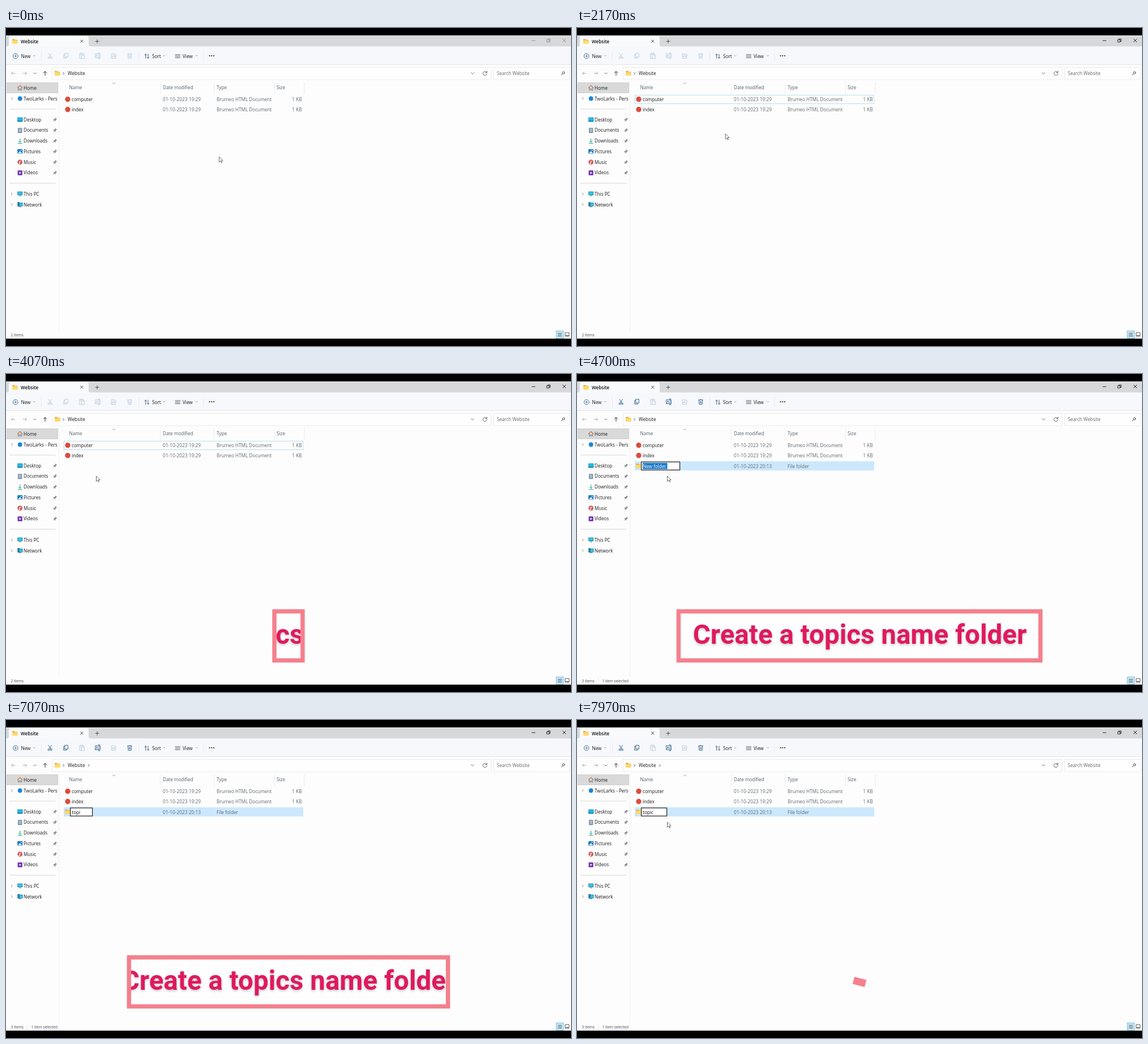
These frames come from a looping animation (998 px wide and 561 px high, 8000 ms). An HTML page:

```html
<!DOCTYPE html>
<html lang="en">
<head>
<meta charset="utf-8">
<title>New folder</title>
<style>
html, body { margin: 0; width: 100%; height: 100%; overflow: hidden; background: #000; }
svg { position: fixed; inset: 0; width: 100%; height: 100%; display: block; }
text { font-family: "Open Sans", "Noto Sans", sans-serif; white-space: pre; }
.banner text { font: 700 47.5px Roboto, sans-serif; fill: #e0195f; filter: drop-shadow(0 2px 2px rgba(0, 0, 0, .22)); }
</style>
</head>
<body>
<svg id="stage" viewBox="0 0 998 561"></svg>
<script>
const LOOP = 8000;
const stage = document.getElementById('stage');

function el(tag, attrs = {}, parent = stage) {
  const node = document.createElementNS('http://www.w3.org/2000/svg', tag);
  for (const k in attrs) node.setAttribute(k, attrs[k]);
  parent.appendChild(node);
  return node;
}
function set(node, attrs) { for (const k in attrs) node.setAttribute(k, attrs[k]); }
const group = (attrs, parent) => el('g', attrs, parent);
const box = (x, y, w, h, fill, more = {}, parent) =>
  el('rect', { x, y, width: w, height: h, fill, ...more }, parent);
const line = (d, stroke, w = 1, parent) =>
  el('path', { d, stroke, 'stroke-width': w, fill: 'none', 'stroke-linecap': 'round', 'stroke-linejoin': 'round' }, parent);
const shape = (d, fill, parent) => el('path', { d, fill }, parent);
const dot = (cx, cy, r, fill, parent) => el('circle', { cx, cy, r, fill }, parent);
function text(x, y, str, fill = '#1c1c1c', size = 8.2, more = {}, parent) {
  const node = el('text', { x, y, fill, 'font-size': size, ...more }, parent);
  node.textContent = str;
  return node;
}
const show = (node, on) => node.setAttribute('visibility', on ? 'visible' : 'hidden');

function folder(x, y, parent) {
  shape(`M${x} ${y + 1}q0 -1 1 -1h2.6l1.2 1.2h3.6q1 0 1 1v4.6q0 1 -1 1h-7.4q-1 0 -1 -1z`, '#e8ab2c', parent);
  box(x, y + 2, 9.4, 5.8, '#ffd968', { rx: .8 }, parent);
}

// Window frame
box(0, 13, 998, 535, '#fdfdfd');
box(0, 13, 998, 20, '#d6d8da');
box(0, 32.5, 998, 32, '#f6f8fc');
shape('M1 33q4 0 4 -4v-11q0 -4 4 -4h133q4 0 4 4v11q0 4 4 4z', '#f8fafc');
box(0, 64, 998, 1, '#e3e5e8');
folder(11, 19.5);
text(26, 26.7, 'Website', '#111', 8.1, { 'font-weight': 600 });
line('M131.5 21l4.4 4.4M135.9 21l-4.4 4.4', '#333', .9);
line('M158 23.5h6M161 20.5v6', '#444', .9);
const controls = group({});
line('M929 22.3h5.5', 'currentColor', .9, controls);
line('M955.5 20.8h4v4h-4zM957 20.6v-1.3h4.2v4.2h-1.4', 'currentColor', .9, controls);
line('M983.3 19.3l5.4 5.4M988.7 19.3l-5.4 5.4', 'currentColor', .9, controls);

// Toolbar
const chevron = (x, y, s = 1.5, c = '#888') => line(`M${x - s} ${y - s / 2}l${s} ${s}l${s} ${-s}`, c, .8);
el('circle', { cx: 16.8, cy: 49.5, r: 4.3, fill: 'none', stroke: '#3a5f78', 'stroke-width': .9 });
line('M14.8 49.5h4M16.8 47.5v4', '#2d7fb8', .9);
text(26.5, 52.8, 'New');
chevron(50, 49);
for (const x of [62, 234, 348.5]) box(x, 41, .8, 17, '#e4e7ea');

const icons = [
  ['M75 44.5l4.3 7.2M80.4 44.5l-4.3 7.2M77 52.5a1.5 1.5 0 1 1 -3 0a1.5 1.5 0 1 1 3 0M81.4 52.5a1.5 1.5 0 1 1 -3 0a1.5 1.5 0 1 1 3 0', 1],
  ['M104.2 44.5h5.2v6.6h-5.2zM104 46.6h-2.2v6.6h5.3v-2', 1],
  ['M131.5 45.3h-1.6v8.2h3M135.8 45.3h1.6v2M131.5 44.3h4.3v2h-4.3zM133.4 48h5v6h-5z', 0],
  ['M163 45.5h-5.3v7h5.3M165.5 45.5h1v7h-1M164.3 43.8v10.4M163.2 43.8h2.2M163.2 54.2h2.2M159 51l1.6 -4l1.6 4', 1],
  ['M189.5 45.2h-3.3v8.2h7.5v-2.4M188 51q.5 -4 4 -4v-2.2l3 3.3l-3 3.2v-2q-2.500 0 -4 1.700z', 0],
  ['M214.500 45.800h8M217 45.600q1.500 -2.500 3 0M215.300 46l.6 7.500h5.200l.6 -7.500M217.600 48.200v3.300M219.400 48.200v3.300', 1]
].map(([d, live]) => ({ node: line(d, '#b9cbd9', .9), live }));

line('M246.700 53.500v-7.500M244.900 47.800l1.800 -1.800l1.800 1.800M251 46v7.500M249.200 51.700l1.800 1.800l1.800 -1.800', '#36566e', .9);
text(258, 52.8, 'Sort');
chevron(279.5, 49);
line('M299 47h8.500M299 49.700h8.500M299 52.400h8.500', '#444', .9);
text(312, 52.8, 'View');
chevron(337, 49);
for (const x of [359.6, 363.3, 367]) dot(x, 49, 1.1, '#222');

// Address row
line('M16 80h-6.500M12 77.500l-2.500 2.500l2.500 2.500', '#a2a6a9', .9);
line('M30 80h6.500M34 77.500l2.500 2.500l-2.500 2.500', '#a2a6a9', .9);
chevron(51, 80, 2, '#555');
line('M69 83.500v-7M66 79.500l3 -3l3 3', '#333', 1);
box(81.5, 69.5, 775.5, 21.5, '#fefefe', { stroke: '#e6e7e9', 'stroke-width': .8 });
box(861.5, 69.5, 134, 21.5, '#fefefe', { stroke: '#e6e7e9', 'stroke-width': .8 });
folder(86, 75.8);
line('M100.800 78.300l1.900 1.900l-1.900 1.900', '#444', .9);
text(109, 83.2, 'Website');
const crumb = line('M145.500 78.300l1.900 1.900l-1.900 1.900', '#444', .9);
chevron(824, 80, 2.6, '#555');
line('M849 78.300a3.500 3.500 0 1 0 .5 2.200M849.500 76v2.500h-2.500', '#555', .9);
text(867, 83.4, 'Search Website', '#666', 8.1);
line('M986.800 79a2 2 0 1 1 -4 0a2 2 0 1 1 4 0M983.200 80.500l-2.200 2.300', '#444', 1);

// Sidebar
box(93, 96, .8, 438, '#ededed');
box(1.5, 96.5, 90, 18, '#d9d9d9', { stroke: '#c6c6c6', 'stroke-width': .7 });
line('M20.500 105.500l4.200 -4l4.200 4', '#d0703a', 1.1);
line('M21.700 105.500v4.200h2v-2.500h2v2.500h2v-4.200', '#70757a', .9);
text(31, 108.5, 'Home');
dot(24.7, 124.5, 3.9, '#1a86d9');
text(31, 127.5, 'TwoLarks - Pers');
for (const y of [124.5, 292.7, 311.5]) line(`M9.300 ${y - 2}l2 2l-2 2`, '#777', .8);
for (const y of [142.6, 273.4]) box(6, y, 81.5, .9, '#d4d4d4');

['Desktop', 'Documents', 'Downloads', 'Pictures', 'Music', 'Videos'].forEach((name, i) => {
  const y = 161.7 + i * 18.75;
  text(31, y + 3, name, '#1c1c1c', 8.1);
  const pin = group({ transform: `translate(86.500 ${y}) rotate(45)` });
  shape('M-1.700 -3.200h3.400v.9l-.6 .4v1.700l1.400 1.300v.7h-5v-.7l1.400 -1.300v-1.700l-.6 -.4z', '#7d868c', pin);
  line('M0 1.500v2.600', '#7d868c', .7, pin);
});
box(20, 157.8, 9.4, 7.8, '#0d83b6', { rx: .8 });
box(20, 157.8, 9.4, 5.6, '#29b6dd', { rx: .8 });
box(21, 176.2, 7.4, 9, '#7790a5', { rx: .8 });
for (const y of [178, 180, 182]) box(22.5, y, 4.4, 1, '#dbe6ee');
line('M24.700 195.500v6.200M22.300 199.500l2.400 2.400l2.400 -2.400M21.300 203.700h7', '#17a286', 1);
box(20.2, 213.8, 9, 8.2, '#1976c4', { rx: 1 });
shape('M20.500 221.500l4 -4.500l4.500 4.500z', '#d8efff');
dot(26.7, 216, .9, '#fff');
dot(24.7, 236.7, 4.4, '#cf5a60');
line('M24.300 238.800v-4.200l2 .8', '#fff', .9);
dot(23.5, 238.8, 1.1, '#fff');
box(20.6, 251.2, 8.2, 8.6, '#7230b5', { rx: .9 });
shape('M23.500 253.500l3.500 2l-3.500 2z', '#fff');
function monitor(x, y) {
  box(x, y, 9, 6.5, '#137fa9', { rx: .7 });
  box(x + .7, y + .7, 7.6, 5, '#39c1dc');
  box(x + 2.5, y + 7, 4, 1, '#5f7480');
}
monitor(20.2, 288.6);
text(31, 296, 'This PC');
monitor(20.6, 308);
box(20.4, 307, 3.5, 8, '#2d7ba8', { rx: .7 });
text(31, 314.8, 'Network');

// Column heads
text(111.5, 108.2, 'Name', '#52606d');
text(277, 108.2, 'Date modified', '#52606d', 8.1);
text(372, 108.2, 'Type', '#52606d');
text(478, 108.2, 'Size', '#52606d');
line('M188.300 98.700l2.200 -2l2.200 2', '#888', .8);
for (const x of [272, 367, 474, 526.5]) box(x, 96, .8, 21, '#e9e9e9');

// Rows
const hovers = [118, 136].map(y => box(102, y, 423, 16, '#def0fb'));
const focus = box(102.4, 118.4, 422.2, 15.2, 'none', { stroke: '#b5d9ec', 'stroke-width': .9 });
const GREY = '#626a70';
['computer', 'index'].forEach((name, i) => {
  const y = 126 + i * 18.1;
  dot(109, y - .3, 4.7, '#dd4b3e');
  text(116, y + 3, name);
  text(277, y + 3, '01-10-2023 19:29', GREY, 8.35);
  text(372, y + 3, 'Brumeo HTML Document', GREY);
  text(522.5, y + 3, '1 KB', GREY, 8.2, { 'text-anchor': 'end' });
});

const created = group({});
box(102, 154, 423, 16.2, '#cce8fc', {}, created);
folder(104.5, 158, created);
text(277, 165.6, '01-10-2023 20:13', GREY, 8.35, {}, created);
text(372, 165.6, 'File folder', GREY, 8.2, {}, created);
const edit = box(113.6, 155.1, 68, 14.3, '#fff', { stroke: '#222', 'stroke-width': 1.2 }, created);
const picked = box(116, 156.8, 43.5, 11, '#1979ca', {}, created);
const label = text(116.3, 165.5, '', '#111', 8.1, {}, created);

// Status bar
const count = text(8.5, 543.6, '', '#3f4a50', 6.6);
const chosen = text(44.5, 543.6, '1 item selected', '#3f4a50', 6.6);
const rule = box(37.5, 537, .6, 9, '#e2e2e2');
box(972, 534.5, 12.4, 12.6, '#cdeafa', { stroke: '#62b4dc', 'stroke-width': .9 });
line('M975 538.500h6.500M975 541h6.500M975 543.500h6.500', '#333', .8);
box(987.6, 537.2, 7, 6.4, 'none', { stroke: '#444', 'stroke-width': .9, rx: .6 });
box(988.5, 542, 5.2, 1.2, '#777');

// Banner
const MID = { x: 499, y: 462 }, EDGE = 7.5, SLIM = 55.5, WIDE = 683, TALL = 94;
const clip = el('clipPath', { id: 'inside' }, el('defs'));
const clipBox = box(0, 0, 0, 0, '#fff', {}, clip);
const banner = group({ class: 'banner' });
const frame = box(0, 0, 0, 0, '#f5808d', {}, banner);
const inner = box(0, 0, 0, 0, '#fefefe', {}, banner);
const clipped = group({ 'clip-path': 'url(#inside)' }, banner);
el('text', { x: 499.5, y: 476, 'text-anchor': 'middle' }, clipped).textContent = 'Create a topics name folder';

const pointer = group({});
el('path', {
  d: 'M0 0v9.300l2.200 -2l1.600 3.200l1.400 -.6l-1.500 -3.100h3z', fill: '#fff',
  stroke: '#4a4a4a', 'stroke-width': .8, 'stroke-linejoin': 'round'
}, pointer);

// Times in ms
const ACTIVE = 700, CREATE = 4400, CRUMB = 5270;
const path = [
  [0, 376.5, 227.2], [1530, 376.5, 227.7], [1720, 371, 243], [2340, 238, 174],
  [2800, 156, 137], [3030, 152, 135], [3110, 150, 148], [3170, 146, 155],
  [3330, 134, 166], [3700, 159.5, 180], [LOOP, 159.5, 180]
];
// start, text, right edge of the field
const typed = [
  [CREATE, 'New folder', 182], [6070, '', 182], [6530, 't', 141.5], [6730, 'to', 146.500],
  [6870, 'top', 151], [7000, 'topi', 153], [7300, 'topic', 159]
];

const ratio = (t, a, b) => Math.min(1, Math.max(0, (t - a) / (b - a)));

function pointerAt(t) {
  const i = path.findIndex(p => p[0] > t) - 1;
  const [a, ax, ay] = path[i], [b, bx, by] = path[i + 1];
  const p = ratio(t, a, b), k = p * p * (3 - 2 * p);
  return [ax + (bx - ax) * k, ay + (by - ay) * k];
}

function drawBanner(t) {
  const spin = t < 5500 ? 1 - ratio(t, 3450, 4040) : ratio(t, 7400, 8145);
  const open = t < 5500
    ? 1 - Math.pow(1 - ratio(t, 4070, 5130), 3.15)
    : 1 - Math.pow(ratio(t, 6730, 7400), 2.55);
  show(banner, spin < 1);
  const size = 1 - spin;
  const w = (SLIM + (WIDE - SLIM) * open) * size, h = TALL * size;
  const iw = Math.max(0, w - 2 * EDGE), ih = Math.max(0, h - 2 * EDGE);
  const rect = (a, b) => ({ x: MID.x - a / 2, y: MID.y - b / 2, width: a, height: b });
  set(frame, rect(w, h));
  set(inner, rect(iw, ih));
  set(clipBox, rect(iw, ih));
  show(clipped, iw > 0 && ih > 0);
  banner.setAttribute('transform', `rotate(${137 * spin} ${MID.x} ${MID.y})`);
}

function draw(t) {
  const made = t >= CREATE;
  controls.setAttribute('color', t < ACTIVE ? '#8d8f91' : '#151515');
  for (const { node, live } of icons) node.setAttribute('stroke', live && made ? '#285f86' : '#b9cbd9');
  show(crumb, t >= CRUMB);
  show(focus, t >= ACTIVE && !made);
  show(chosen, made);
  show(rule, made);
  count.textContent = made ? '3 items' : '2 items';

  const [x, y] = pointerAt(t);
  pointer.setAttribute('transform', `translate(${x} ${y})`);
  show(pointer, t < 6070 || t >= 7500);
  show(hovers[0], y >= 117 && y < 136);
  show(hovers[1], y >= 136 && y < 153);

  created.setAttribute('display', made ? 'inline' : 'none');
  if (made) {
    const [start, str, right] = typed.filter(s => s[0] <= t).pop();
    const fresh = start === CREATE;
    label.textContent = str;
    label.setAttribute('fill', fresh ? '#fff' : '#111');
    edit.setAttribute('width', right - 114);
    picked.setAttribute('display', fresh ? 'inline' : 'none');
  }
  drawBanner(t);
}

function tick() {
  draw(performance.now() % LOOP);
  requestAnimationFrame(tick);
}
tick();
</script>
</body>
</html>
```
